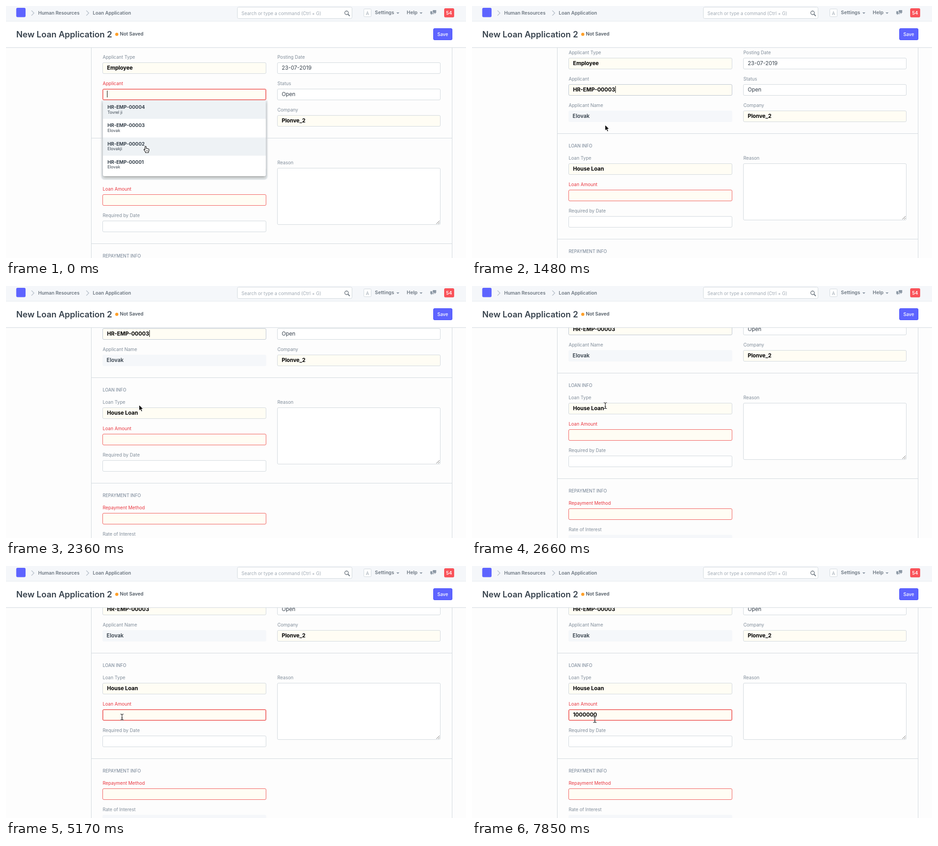
Animation of 1011 by 554 pixels, one loop 8 s. Source, as an HTML page:

```html
<!DOCTYPE html>
<html lang="en">
<head>
<meta charset="utf-8">
<title>Loan Application</title>
<style>
  html, body { margin: 0; width: 100%; height: 100%; overflow: hidden; background: #fdfdfd; }
  body { position: relative; font-family: Inter, sans-serif; color: #36414c; }
  div, span.t, svg { position: absolute; box-sizing: border-box; }
  .t { height: 20px; line-height: 20px; white-space: pre; }

  #nav { left: 0; top: 0; width: 100%; height: 34px; background: #f5f7fa; border-bottom: 1px solid #e4e9ee; }
  #head { left: 0; top: 34px; width: 100%; height: 58px; background: #fff; border-bottom: 1px solid #d1d8dd; }
  #view { left: 0; top: 92px; width: 100%; bottom: 0; overflow: hidden; }
  #form { left: 0; top: -92px; width: 100%; height: 760px; }
  #frame { left: 187px; top: 0; width: 794px; height: 760px; border: solid #d1d8dd; border-width: 0 1px; }
  .rule { left: 187px; width: 794px; height: 1px; background: #d1d8dd; }

  .crumb { font-size: 10.35px; font-weight: 600; color: #6c7680; }
  .menu { font-size: 10.6px; font-weight: 600; color: #6c7680; }
  .hint { font-size: 10.05px; color: #a0aab4; }
  .title { font-size: 18.45px; font-weight: 600; }
  .note { font-size: 10.4px; font-weight: 600; color: #4f5963; }
  .label { font-size: 10.05px; color: #808d9a; }
  .section { font-size: 9.65px; font-weight: 500; color: #8491a0; }
  .strong { font-size: 10.45px; font-weight: 700; }
  .sub { font-size: 9px; }
  .white { font-size: 10.1px; font-weight: 500; color: #fff; }

  .field {
    width: 360px; height: 25px; padding-left: 9px; line-height: 23px; font-size: 11.8px; white-space: pre;
    background: #fff; border: 1px solid #d1d8dd; border-radius: 3px;
  }
  .field.right { width: 359px; }
  .field.must { background: #fffdf4; font-weight: 700; color: #000; }
  .field.fixed { background: #f5f7fa; border-color: #f5f7fa; font-weight: 600; padding-left: 8px; }
  .field.focus { border-color: #bcc5d0; }
  .label.bad { color: #e9363f; }
  .field.bad { border-color: #f05a5a; }
  .field.bad.focus { border-color: #ee5050; box-shadow: inset 0 0 0 .6px #ee5050; }
  .caret { display: inline-block; width: 1px; height: 15px; margin-right: -1px; vertical-align: -3px; background: #000; }

  #list {
    background: #fff; width: 358px; height: 166px; border-radius: 0 0 3px 3px;
    box-shadow: 0 3px 6px rgba(0,0,0,.32), 0 4px 1px 4px rgba(228,233,238,.7);
  }
  .row { left: 0; width: 100%; height: 40.3px; }
  .row.on { background: #eef2f5; }
  .cursor { left: 0; top: 0; overflow: visible; z-index: 1; }
</style>
</head>
<body>
<div id="view"><div id="form"><div id="frame"></div></div></div>
<div id="head"></div>
<div id="nav"></div>
<svg width="1011" height="92" fill="none">
  <rect x="22.5" y="4" width="20.5" height="20.5" rx="3" fill="#5e64ff"/>
  <path d="M56 10l5.5 5.5L56 21M176.5 10l5.5 5.5-5.5 5.5" stroke="#b4bec8" stroke-width="1.3"/>
  <rect x="508.5" y="2.5" width="252" height="25" rx="3" fill="#fff" stroke="#d1d8dd"/>
  <circle cx="748.5" cy="15" r="4" stroke="#69737d" stroke-width="1.4"/>
  <path d="M751.5 18l4 4" stroke="#69737d" stroke-width="1.8"/>
  <rect x="786.5" y="6.5" width="16" height="17" rx="2" fill="#fff" stroke="#d1d8dd"/>
  <path d="M858 14h6.500l-3.250 3.500zM909 14h6.500l-3.250 3.500z" fill="#8d99a6"/>
  <path d="M938 9h7.500v6H944v2.500L941.500 15H938z" fill="#8d99a6"/>
  <path d="M932.500 11.500h4.500v4.500h4v1.500h-4.500L934.500 20v-2.500h-2z" fill="#8d99a6"/>
  <rect x="963" y="5" width="22" height="20" rx="3" fill="#f9535a"/>
  <circle cx="243.5" cy="62.2" r="3.5" fill="#ffa02a"/>
  <rect x="939.5" y="49.5" width="41" height="25" rx="2.5" fill="#5e64ff" stroke="#444bff"/>
</svg>
<svg class="cursor" id="arrow" width="1" height="1">
  <path d="M0 0v12.500l2.900-2.700 2 4.600 2.200-.9-2-4.500h3.900z" stroke="#fff" stroke-width=".9"/>
</svg>
<svg class="cursor" id="hand" width="1" height="1" stroke="#111">
  <path d="M-1.500 1.200q1.500-2 2.600 0v4q1.700-.8 2.300.4 1.600-.5 2.100.6 1.800-.2 1.800 1.500v2.600l-1.300 2.500v1.700H-.5v-1.600L-3.800 8.500q-.5-1.900 1-1.600l1.300 1.200z" fill="#fff" stroke-width="1.1" stroke-linejoin="round"/>
  <path d="M1.300 9v3M3 9v3M4.700 9v3" stroke-width=".6"/>
</svg>
<svg class="cursor" id="beam" width="1" height="1" fill="none">
  <defs><path id="bar" d="M-3.500-6.500Q0-6.500 0-4.500 0-6.500 3.500-6.500M0-5V5M-3.500 6.500Q0 6.500 0 4.500 0 6.500 3.500 6.500M-1.500 2h3"/></defs>
  <use href="#bar" stroke="#fff" stroke-width="2.4" opacity=".8"/>
  <use href="#bar" stroke="#111" stroke-width="1.1"/>
</svg>
<script>
const $ = id => document.getElementById(id);
const form = $('form');

function add(parent, cls, left, top, tag = 'div') {
  const el = document.createElement(tag);
  el.className = cls;
  el.style.left = left + 'px';
  el.style.top = top + 'px';
  parent.append(el);
  return el;
}

// y is the middle of the capitals
function text(parent, cls, x, y, str) {
  const el = add(parent, 't ' + cls, x, y - 10, 'span');
  el.textContent = str;
  return el;
}

function field(x, y, name, value = '', cls = '') {
  const label = text(form, 'label', x + .5, y - 12, name);
  const box = add(form, 'field ' + cls, x, y);
  const val = document.createElement('span');
  const caret = document.createElement('span');
  caret.className = 'caret';
  caret.style.visibility = 'hidden';
  val.textContent = value;
  box.append(val, caret);
  const bad = on => [label, box].forEach(el => el.classList.toggle('bad', on));
  return { box, val, caret, bad };
}

const L = 212, R = 596;
field(L, 124, 'Applicant Type', 'Employee', 'must');
const applicant = field(L, 182, 'Applicant', '', 'must');
field(L, 240, 'Applicant Name', 'Elovak', 'fixed');
field(R, 124, 'Posting Date', '23-07-2019', 'right');
field(R, 182, 'Status', 'Open', 'right');
field(R, 240, 'Company', 'Plonve_2', 'right must');

add(form, 'rule', 187, 290);
text(form, 'section', 212.5, 318, 'LOAN INFO');
field(L, 356, 'Loan Type', 'House Loan', 'must');
const amount = field(L, 414, 'Loan Amount', '', 'must');
amount.bad(true);
field(L, 472, 'Required by Date');
const reason = field(R, 356, 'Reason', '', 'right').box;
reason.style.height = '125px';
reason.insertAdjacentHTML('beforeend',
  '<svg style="right:0;bottom:0" width="9" height="9"><path d="M1 8L8 1M5 8l3-3" stroke="#6b6b6b"/></svg>');

add(form, 'rule', 187, 522);
text(form, 'section', 212.5, 550, 'REPAYMENT INFO');
field(L, 588, 'Repayment Method', '', 'must').bad(true);
field(L, 646, 'Rate of Interest', '', 'fixed');

const list = add(form, '', 213, 208);
list.id = 'list';
const people = ['Tovrel ji', 'Elovak', 'Elovakji', 'Elovak'];
const rows = people.map((name, i) => {
  const row = add(list, 'row', 0, i * 40.3);
  text(row, 'strong', 10, 15, 'HR-EMP-0000' + (4 - i));
  text(row, 'sub', 10, 25.5, name);
  return row;
});

const page = document.body;
text(page, 'crumb', 70.7, 15.2, 'Human Resources');
text(page, 'crumb', 190.8, 15.2, 'Loan Application');
text(page, 'hint', 517.5, 16, 'Search or type a command (Ctrl + G)');
text(page, 'hint', 791, 15.5, 'A');
text(page, 'menu', 810.8, 15, 'Settings');
text(page, 'menu', 880.8, 15, 'Help');
text(page, 'white', 967.3, 15.2, '54').style.fontWeight = 600;
text(page, 'title', 22.6, 62, 'New Loan Application 2');
text(page, 'note', 250.3, 62.2, 'Not Saved');
text(page, 'white', 948, 62, 'Save');

// Tracks of [time, value...]; each value holds until the next time
const PICK = 1180, CLICK = 4570, LOOP = 8000;
const scroll = [[0, 0], [1480, 10], [1630, 42], [1770, 70], [1920, 82], [2070, 87], [2360, 89], [2510, 96], [2660, 99]];
const blink = [0, 150, 590, 1030, PICK, 1630, 2070, 2660, 3100, 3540, CLICK, 5170, 5620, 7850];
const keys = [5620, 5910, 6060, 6360, 6500, 6800, 7400];
const pointer = [
  [0, 'hand', 307, 308], [440, 'hand', 301, 301], [590, 'hand', 297, 294], [1030, 'hand', 293, 264],
  [PICK, 'arrow', 292.5, 261.5], [2510, 'beam', 293, 263],
  [3540, 'beam', 289, 268], [3690, 'arrow', 272, 287], [3840, 'arrow', 246, 302], [3980, 'arrow', 222, 309],
  [4130, 'beam', 217, 322], [4280, 'beam', 238, 329], [4430, 'beam', 255, 332], [7850, 'beam', 270, 337.5]
];
const past = (times, t) => times.filter(at => at <= t).length;
const pick = (track, t) => track[past(track.map(k => k[0]), t) - 1].slice(1);
const show = (el, on) => { el.style.visibility = on ? 'visible' : 'hidden'; };

function draw(t) {
  const picked = t >= PICK, clicked = t >= CLICK;
  const lit = past(blink, t) % 2 === 1;

  form.style.transform = `translateY(${-pick(scroll, t)[0]}px)`;
  show(list, !picked);
  const hover = t < 1030 ? 2 : 1;
  rows.forEach((row, i) => row.classList.toggle('on', i === 0 || i === hover));

  applicant.bad(!picked);
  applicant.val.textContent = picked ? 'HR-EMP-00003' : '';
  applicant.box.classList.toggle('focus', !clicked);
  show(applicant.caret, lit && !clicked);

  amount.val.textContent = '1000000'.slice(0, past(keys, t));
  amount.box.classList.toggle('focus', clicked);
  show(amount.caret, lit && clicked);

  const [kind, x, y] = pick(pointer, t);
  for (const id of ['arrow', 'hand', 'beam']) show($(id), id === kind);
  $(kind).style.transform = `translate(${x}px, ${y}px)`;
}

const start = performance.now();
function tick() {
  draw((performance.now() - start) % LOOP);
  requestAnimationFrame(tick);
}
draw(0);
requestAnimationFrame(tick);
</script>
</body>
</html>
```
